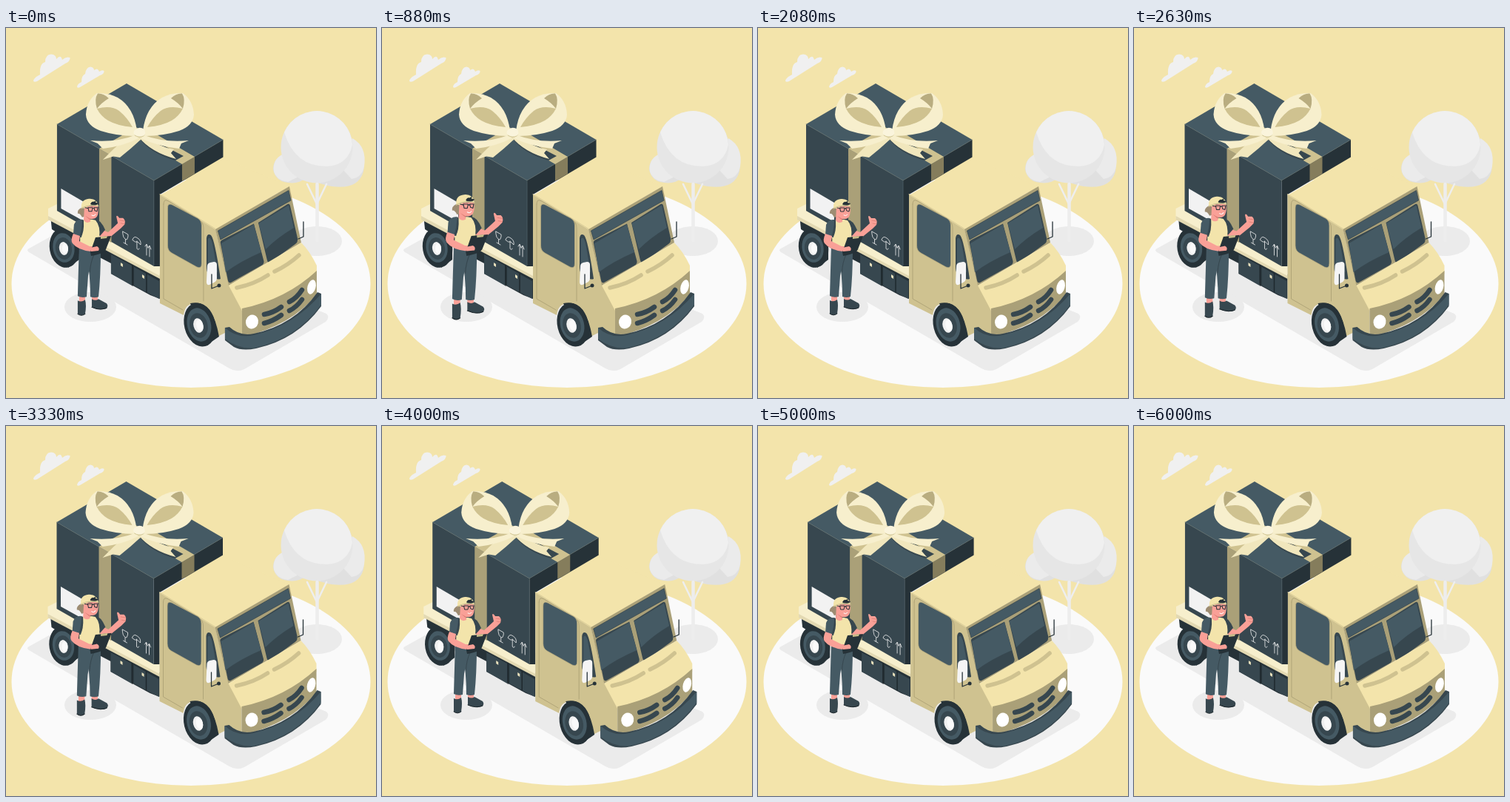
Recreate the animation shown at these times as an HTML page. Size 500 by 500 pixels, loop 6.04 s.

```html
<!DOCTYPE html>
<html lang="en">
<head>
<meta charset="utf-8">
<title>Gift delivery</title>
<style>
html, body { margin: 0; width: 100%; height: 100%; overflow: hidden; background: #f3e4ab; }
svg { display: block; width: 100vw; height: 100vh; }
.night { fill: #263238; } .slate { fill: #37474f; } .steel { fill: #455a64; }
.cream { fill: #f7efcd; } .butter { fill: #f3e4ab; } .sand { fill: #cfc290; } .khaki { fill: #aaa078; }
.skin { fill: #f9a097; } .fog { fill: #ebebeb; }
.line { fill: none; stroke-linecap: round; stroke-linejoin: round; }
</style>
</head>
<body>
<svg viewBox="0 0 500 500">
  <ellipse cx="250" cy="345.500" rx="242.500" ry="140.500" fill="#fafafa"/>
  <g fill="#f0f0f0">
    <path d="M37 71Q39 66 46 63Q45 48 53 46Q53 36 61 35.500Q68 36 68 42Q74 35 76 43Q81 38 86.500 40Q87 45 80 48L42 72Q37 74 37 71Z"/>
    <path d="M96 79Q97 75 102 73Q102 64 107 62Q108 53 114 52.500Q119 53 119 57Q124 53 126 59Q130 56 132.500 58Q133 62 127 64L100 80Q96 82 96 79Z"/>
  </g>

  <g id="tree">
    <ellipse cx="420" cy="288" rx="34" ry="20" fill="#ebebeb"/>
    <path d="M404 203Q428 212 440 214Q476 219 483 194Q488 166 468 150L380 170Q361 174 361 191Q364 207 381 209Q396 211 404 203Z" fill="#e0e0e0"/>
    <path d="M468 149Q488 160 484 187Q481 202 467 204L452 188Z" fill="#ebebeb"/>
    <path d="M373 171Q360 178 362 194Q366 206 381 208L397 200Z" fill="#ebebeb"/>
    <circle cx="420" cy="161" r="48.500" fill="#e6e6e6"/>
    <path d="M376 141A48 48 0 0 1 468 158Q462 186 433 187Q390 187 376 141Z" fill="#f0f0f0"/>
    <path class="line" d="M407 211L420 238L433 211" stroke="#eee" stroke-width="2.500"/>
    <path class="line" d="M420.500 211V287" stroke="#ededed" stroke-width="4.500"/>
  </g>

  <path class="fog" d="M31 298L78 272Q90 270 100 276L290 330L433 386Q438 391 432 397L322 461Q312 466 302 460L31 303Q27 300 31 298Z"/>
  <ellipse class="fog" cx="114" cy="377" rx="35" ry="20"/>

  <g id="truck">
    <path class="night" d="M60 252L208 333V366L195 361L142 332V318L100 296L62 272Z"/>
    <path class="slate" d="M142 306L170 321V348L142 332ZM173 323L207 342V366L173 348Z"/>
    <path class="line" d="M171 320V348M190 332V357" stroke="#1f292e" stroke-width="1.500"/>
    <path d="M155 317l3 2v4l-3-2ZM184 333l3 2v4l-3-2Z" fill="#e8e0bc"/>
    <g id="rearWheel">
      <path class="night" d="M76 271Q91 263 99 281V313L84 324Z"/>
      <ellipse class="night" cx="79" cy="297" rx="20" ry="27" transform="rotate(-10 79 297)"/>
      <ellipse class="steel" cx="78" cy="297" rx="14.500" ry="20" transform="rotate(-10 78 297)"/>
      <ellipse class="slate" cx="78" cy="298" rx="11" ry="15" transform="rotate(-10 78 298)"/>
      <ellipse cx="78" cy="298" rx="6" ry="9" fill="#f0f0f0" transform="rotate(-10 78 298)"/>
      <ellipse cx="80" cy="298" rx="4" ry="7" fill="#fafafa"/>
    </g>
    <path d="M57 244L69 238L208 318V338L57 258Z" class="cream"/>
    <path d="M57 254L208 335V339L57 259Z" fill="#e3d9b2"/>

    <g id="gift">
      <path class="steel" d="M163 75L293.500 151L200 206L69 130Z"/>
      <path class="slate" d="M69 130L200 206V322L69 247Z"/>
      <path class="night" d="M200 206L293.500 151V174.500L208 225V322H200Z"/>
      <path class="line" d="M69 130L200 206L293 151M200 206V321" stroke="#5a6c75" stroke-width=".5"/>
      <path class="khaki" d="M126 163L142.500 172.500V290L126 280Z"/>
      <path d="M238 184L255 174V197L238 207Z" fill="#857d5c"/>
      <path class="sand" d="M126 163L176 134L190 145L142.500 172.500ZM238 184L174 147L190 136L255 174Z"/>
      <path class="slate" d="M180 149Q196 170 229 179L240 173L215 160Z"/>
      <path d="M74.500 217L107 236V262L74.500 244Z" fill="#f2f2f2"/>
      <g class="line" stroke="#f3f3f3" stroke-width=".8" transform="translate(0 -2)">
        <path d="M158 277L165 281V284Q164 289 162 288Q158 285 158 281ZM161.500 288V293M159 292L164 295"/>
        <path d="M171 288Q173 282 178 286Q183 289 182 295L178 291L175 291ZM177 290V300Q179 303 180 300"/>
        <path d="M190 309V295M188 297L190 294L192 299M194 311V297M192 299L194 296L196 301"/>
      </g>

      <g id="bow">
        <path d="M177 146Q157 151 145 164L131 178L145 173.500L154 175Q168 164 183 150Z" fill="#f1e7bd"/>
        <path d="M180 148Q196 168 230 177L223 169L227 164Q207 161 189 146Z" fill="#f1e7bd"/>
        <path class="cream" d="M174 145Q149 155 114 152L124 156L131 163Q158 160 179 149Z"/>
        <path class="cream" d="M187 145Q213 155 247 152L237 156L234 163Q206 160 182 149Z"/>
        <g id="loop">
          <path class="cream" d="M177 139Q173 107 151 94Q138 87 123 88Q109 98 108 117Q109 132 128 139Q150 146 174 146Z"/>
          <path class="sand" d="M171 134Q150 132 138 125Q128 119 123 109Q142 104 153 112Q164 121 171 134Z"/>
          <path d="M124 88.500Q119 96 123 109Q129 101 139 95Q132 88 124 88.500Z" fill="#b9ad80"/>
        </g>
        <use href="#loop" transform="translate(362 0) scale(-1 1)"/>
        <path d="M174 138Q180 132 187 137Q190 142 186 146Q180 149 174 145Q171 141 174 138Z" fill="#faf4dc"/>
        <path class="line" d="M174 145Q180 149 186 146" stroke="#d5ca99"/>
      </g>
    </g>

    <g id="cab">
      <path class="butter" d="M208 226L294 176L383 214L283 273Z"/>
      <path class="sand" d="M208 224L283 271L301 346L319 377V419L296 412L286 417Q284 385 262 374Q243 368 240 388L208 372Z"/>
      <path class="line" d="M208 225L283 272" stroke="#e8daa3" stroke-width="1"/>
      <path class="line" d="M213 238Q213 230 220 234L261 259Q267 263 267 270V369M213 238V366L239 381" stroke="#a99e73" stroke-width=".8"/>
      <path class="steel" d="M218.500 243Q218.500 236 225 239L259 257Q264.500 260 264.500 267V318Q264.500 326 258 323L224 304Q218.500 301 218.500 294Z" stroke="#b9ad80" stroke-width=".8"/>
      <path class="slate" d="M271 284Q272 277 277 280Q282 285 290 339Q285 341 276 335Q271 331 271 325Z"/>
      <path class="steel" d="M273 285Q276 280 279 291L286 330L273 322Z"/>

      <path class="khaki" d="M283 272L383 214L399 290L301 348Z"/>
      <path class="steel" d="M286.500 274L382 219.500L385 233L290 286Z" stroke="#37474f" stroke-width=".8"/>
      <path class="slate" d="M290 291Q289 288 293 286L335 264.500L348.500 315Q349 319 345 321L304 344Q301 345 300 341Z"/>
      <path class="slate" d="M341 263L379 239Q383 236 384 240L394 284Q395 289 391 292L358 316Q354 319 353 314Z"/>
      <path class="steel" d="M291 291L335 265.500L345 303Q317 315 297 330ZM341.500 264L382 239.500L389 270Q367 283 351 299Z"/>

      <path class="butter" d="M301 348L399 290Q411 302 420 321V332Q374 372 319 382Z"/>
      <path class="line" d="M312 351Q336 346 354 334M363 329Q382 320 396 307" stroke="#cfc290" stroke-width="5.500"/>
      <path class="khaki" d="M319 379Q378 367 420 328V360Q386 402 319 418Z"/>
      <path class="line" d="M349 387Q361 385 372 377M349 399Q361 396 372 388M383 370Q393 365 400 354M383 382Q393 377 400 367" stroke="#37474f" stroke-width="6.500"/>
      <ellipse cx="332.500" cy="397" rx="8.500" ry="9.500" fill="#fff" transform="rotate(15 332.500 397)"/>
      <ellipse cx="413" cy="350" rx="5.500" ry="10" fill="#fff" transform="rotate(15 413 350)"/>
      <path class="slate" d="M296 405L302 404Q316 417 335 413Q390 401 421 357L426 359V376Q393 421 338 433Q319 437 308 431L296 422Z"/>
      <path class="steel" d="M296 405Q312 420 335 415Q390 402 426 359V374Q392 420 337 432Q315 435 296 420Z"/>

      <path class="night" d="M249 372Q279 365 288 417L272 428Z"/>
      <ellipse class="night" cx="262" cy="401" rx="21" ry="30" transform="rotate(-14 262 401)"/>
      <ellipse class="steel" cx="261" cy="401" rx="16" ry="23" transform="rotate(-14 261 401)"/>
      <ellipse class="slate" cx="260.500" cy="402" rx="12" ry="17" transform="rotate(-14 260.500 402)"/>
      <ellipse cx="260" cy="402" rx="6.500" ry="10" fill="#f0f0f0" transform="rotate(-14 260 402)"/>
      <ellipse cx="262" cy="402" rx="4.500" ry="8" fill="#fafafa" transform="rotate(-14 262 402)"/>

      <path class="line" d="M402 262V282L395 285" stroke="#263238" stroke-width="1.300"/>
      <path d="M272 322Q272 318 276 317L281 316Q285 316 285 320V338Q285 342 281 344L275 347Q271 348 271 343Z" fill="#f5f5f5"/>
      <path class="line" d="M278 333V352L288 348" stroke="#263238" stroke-width="1.300"/>
      <circle class="night" cx="288" cy="348" r="2.500"/>
    </g>
  </g>

  <g id="courier">
    <path class="skin" d="M99 358H107V370H99ZM116 356H124V368H116Z"/>
    <path class="slate" d="M97 368Q102 371 107 367Q109 374 107 386Q102 390 97 386ZM116 366Q121 369 125 366L136 372Q139 376 135 379Q127 382 116 377Z"/>
    <path class="line" d="M97 386Q102 390 107 386M116 377Q127 382 136 378" stroke="#1b252a" stroke-width="1"/>
    <path class="steel" d="M113 300L128 298Q128 335 125 363Q120 365 114 363Q114 332 109 309Z"/>
    <path class="steel" d="M99 296L121 302Q114 315 111 335L109 363Q103 365 97 362Q98 325 99 296Z"/>
    <path class="line" d="M119 306Q114 317 113.500 330" stroke="#37474f" stroke-width="1"/>
    <path class="skin" d="M130 273L138 276L151 264L149 255Q150 252 153 257L158 257Q162 260 160 266L155 271L139 284Q134 287 126 281Z"/>
    <path class="line" d="M154 260L160 261M155 264L160 265" stroke="#d9786f" stroke-width=".7"/>
    <path class="slate" d="M121 259Q128 259 134 273L127 281L119 274Z"/>
    <path class="butter" d="M101 261Q110 257 121 260Q128 268 126 283L128 296Q116 300 100 294Z"/>
    <path class="steel" d="M103 259Q95 258 92 266L91 280L102 283Q105 271 103 259Z"/>
    <path class="slate" d="M103 259L105 260Q106 277 101 283L99 282Q103 273 103 259Z"/>
    <path class="skin" d="M91 278L100 281L99 288L113 295L123 295Q128 298 124 302L115 302Q97 300 90 291Q87 287 91 278Z"/>
    <path class="night" d="M121 283L142 281L135 299Q133 305 115 308L114 303Z"/>
    <path d="M128 282L137 281L136 284L128 285Z" fill="#c9bc89"/>
    <path class="skin" d="M114 297L123 295Q127 297 125 301L115 302Z"/>
    <path d="M102 243Q96 246 97 251Q100 250 103 256L110 254L109 243Z" fill="#9d8c72"/>
    <path class="skin" d="M106 242L124 240Q126 249 123 255Q120 259 114 258L114 262Q108 265 105 260Z"/>
    <path d="M107 254L114 258V260Z" fill="#dd7c73"/>
    <path class="butter" d="M102 243Q101 232 112 231Q123 230 125 241Q115 238 106 244Z"/>
    <path class="night" d="M114 238Q116 234 119 235L122 233L121 236L125 237Q123 241 115 239Z"/>
    <path class="line" d="M102 244Q112 238 125 241" stroke="#cfc290" stroke-width="1.200"/>
    <path class="line" d="M107 243L111 244M111 243L117 243L116 248L112 248ZM119 243L124 243L123 248L120 247ZM117 244H119" stroke="#263238" stroke-width="1"/>
    <path class="line" d="M116 253Q119 255 121 252" stroke="#fff" stroke-width="1"/>
  </g>
</svg>
<script>
const LOOP = 6040, LEAD = 20;
const SHAKE = [[0, 0], [.1, -1], [.2, 2], [.3, -4], [.4, 4], [.5, -4], [.6, 4], [.7, -4], [.8, 2], [.9, -1], [1, 0]];
const BEAT = [[0, 1], [.1, 1.1], [.3, 1], [.4, 1], [.5, 1.1], [.6, 1], [1, 1]];
const truck = document.getElementById('truck');
const courier = document.getElementById('courier');

function sample(keys, phase) {
  const i = keys.findIndex(([at]) => at > phase);
  const [t0, v0] = keys[i - 1], [t1, v1] = keys[i];
  return v0 + (v1 - v0) * (phase - t0) / (t1 - t0);
}

function draw(time) {
  const t = time % LOOP + LEAD;
  const x = sample(SHAKE, t % 3000 / 3000);
  const scale = sample(BEAT, t % 6000 / 6000);
  truck.setAttribute('transform', `translate(${x} 0)`);
  courier.setAttribute('transform', `translate(125 309) scale(${scale}) translate(-125 -309)`);
}

const start = performance.now();
function frame() {
  draw(performance.now() - start);
  requestAnimationFrame(frame);
}
frame();
</script>
</body>
</html>
```
